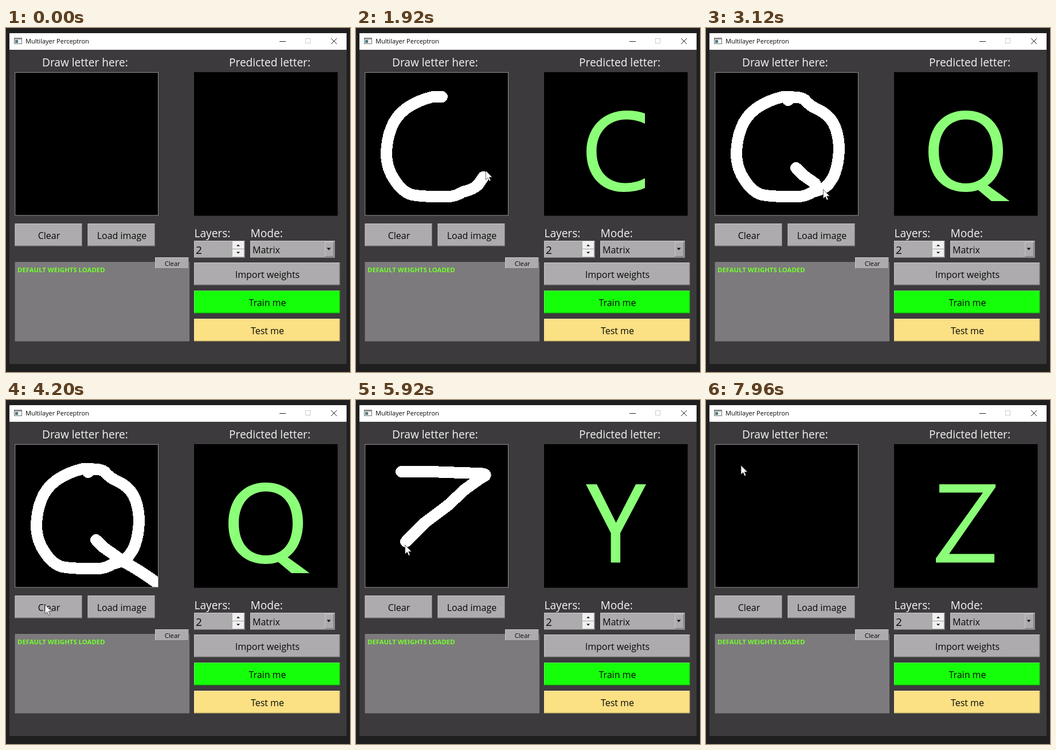
These frames come from a looping animation (600x600 px, 8 s). An HTML page:

```html
<!DOCTYPE html>
<html lang="en">
<head>
<meta charset="utf-8">
<title>Letter recogniser</title>
<style>
  html, body { margin: 0; width: 100%; height: 100%; overflow: hidden; background: #201f20; }
  svg { display: block; width: 100vw; height: 100vh; }
  text { font: 16px "Open Sans", "Noto Sans", sans-serif; fill: #080808; }
  .heading { font-size: 19.1px; fill: #f4f4f4; }
  .middle { text-anchor: middle; }
  .ink { fill: none; stroke: #fff; stroke-width: 20; stroke-linecap: round; stroke-linejoin: round; }
</style>
</head>
<body>
<svg id="stage" viewBox="0 0 600 600">
  <defs><clipPath id="board"><rect x="16" y="78" width="249" height="248"/></clipPath></defs>
  <rect width="600" height="600" fill="#201f20"/>
  <rect x="6" y="9" width="588" height="577" fill="#3c3a3c"/>

  <rect x="6" y="9" width="588" height="29" fill="#fff"/>
  <rect x="14.5" y="17.5" width="13" height="10" fill="#f4f4f4" stroke="#777"/>
  <path d="M15 18h12v2h-12z" fill="#999"/>
  <path d="M16 21h5v5h-5z" fill="#4d7d82"/>
  <text x="34" y="27" style="font-size:11px">Multilayer Perceptron</text>
  <g fill="none" stroke="#222">
    <path d="M477 23.5h11M567 18l10 10M577 18l-10 10"/>
    <rect x="522.5" y="18.5" width="8" height="8" stroke="#ccc"/>
  </g>

  <text class="heading" x="63" y="67">Draw letter here:</text>
  <text class="heading" x="389" y="67">Predicted letter:</text>
  <rect x="15.8" y="77.5" width="249.7" height="249.3" stroke="#929092"/>
  <rect x="328" y="77" width="250.5" height="250.5"/>
  <rect x="15.5" y="408" width="304.5" height="138.5" fill="#7d7a7d"/>
  <text x="20" y="426" style="font-size:11.35px;font-weight:700;fill:#73ff2e">DEFAULT WEIGHTS LOADED</text>
  <text class="heading" x="328.5" y="365">Layers:</text>
  <text class="heading" x="426.5" y="365">Mode:</text>
  <g id="controls"></g>
  <text x="331" y="394" style="font-size:19px">2</text>
  <text x="430" y="392.5">Matrix</text>
  <path d="M402 380.5h6l-3-3zM402 390.5h6l-3 3zM559.5 383.5h7l-3.5 4z" fill="#111"/>

  <path id="prediction" fill="#8cff78"/>
  <g id="drawing" clip-path="url(#board)" shape-rendering="crispEdges"></g>
  <path id="cursor" d="M0 0V16L3.7 12.5 6.3 18.5 8.7 17.4 6.2 11.6H11.3Z" fill="#fff" stroke="#222" stroke-width=".7"/>
</svg>
<script>
const LOOP = 8000, STEP = 40, INK_LAG = 40;
const $ = id => document.getElementById(id);

function add(parent, tag, attributes, text = "") {
  const node = document.createElementNS("http://www.w3.org/2000/svg", tag);
  for (const key in attributes) node.setAttribute(key, attributes[key]);
  node.textContent = text;
  parent.append(node);
  return node;
}

function button(x, y, w, h, fill, label = "", size = 16) {
  const box = $("controls");
  add(box, "rect", { x, y, width: w, height: h, fill });
  add(box, "path", { d: `M${x + .5} ${y + h}V${y + .5}H${x + w}`, fill: "none", stroke: "#fff", "stroke-opacity": .35 });
  add(box, "path", { d: `M${x} ${y + h - .5}H${x + w - .5}V${y}`, fill: "none", stroke: "#000", "stroke-opacity": .35 });
  add(box, "text", { class: "middle", x: x + w / 2 + .7, y: y + h / 2 + size * .46, style: `font-size:${size}px` }, label);
}

const GREY = "#adabad";
button(15.5, 341, 117.5, 39.5, GREY, "Clear");
button(142.5, 341, 117.5, 39.5, GREY, "Load image");
button(260, 400, 59, 20, GREY, "Clear", 11.2);
button(328, 409, 254.5, 39.5, GREY, "Import weights");
button(328, 458, 254.5, 39.5, "#15ff0a", "Train me");
button(328, 507, 254.5, 39.5, "#fbe084", "Test me");
button(328, 371, 89, 30, GREY);
button(395, 372, 21, 14, "#f0f0f0");
button(395, 386, 21, 14, "#f0f0f0");
button(426, 371, 148, 30, GREY);
button(556, 373, 16, 26, GREY);

const ring = "M453 144C494 144 518 172 518 214C518 257 493 286 453 286C413 286 388 258 388 216C388 173 413 144 453 144Z" +
  "M453 159.5C425 159.5 406 181 406 215C406 249 424 271 453 271C482 271 500 250 500 215C500 180 482 159.5 453 159.5Z";
const LETTERS = {
  C: "M504 149Q490 144 473 144C430 144 402 174 402 216C402 258 428 286 467 286Q489 286 504 279V262Q489 270.5 470 270.5C438 270.5 419.5 248 419.5 215C419.5 182 440 159.5 472 159.5Q489 159.5 504 167Z",
  O: ring,
  Q: ring + "M474 282L491 274 529.5 302H498Z",
  Y: "M401 147H420L453.5 214 488 147H506L461 232V283.5H444.5V232Z",
  Z: "M407 147H505V152L424 268.5H503V283.5H401V276L483 161.5H407Z"
};
const PREDICTIONS = [[0, ""], [1400, "C"], [2240, "O"], [3000, "Q"], [5520, "Y"], [6280, "Z"]];

const linear = p => p;
const smooth = p => p * p * (3 - 2 * p);

// Pointer gestures: start, end, path; those with a clear time leave ink.
const gestures = [
  [600, 880, "M606 500Q560 490 499 466"],
  [880, 1060, "M499 466L145 120"],
  [1160, 1880, "M150 120H134Q108 126 88 140Q70 153 62 173Q53 195 53 222Q54 245 66 263Q80 286 98 291Q115 294 140 294H163Q175 293 186 286Q207 281 214 272L222 260", 4400],
  [1880, 2520, "M222 260Q231 240 232 213Q232 185 222 166Q213 150 195 142Q181 136 172 125Q163 119 148 122L143 126", 4400],
  [2580, 2900, "M143 126Q108 180 157 244"],
  [2980, 3300, "M157 244L170 257 190 271 205 282Q235 298 270 324", 4400],
  [3360, 4000, "M270 324C270 470 110 480 68 357"],
  [5080, 5240, "M68 357L79 125"],
  [5280, 5880, "M79 125H130L212 128Q228 128 225 132L215 138 190 156 160 184 120 214 87 247", 7100],
  [5880, 6520, "M87 247L83 253Q130 250 170 251L232 254", 7100],
  [6560, 6880, "M232 254Q170 340 70 357"],
  [7400, 7760, "M70 357L61 114"]
].map(([start, end, d, clear]) => {
  const path = add($("drawing"), "path", { d, class: "ink" });
  const length = path.getTotalLength();
  const ease = clear ? linear : smooth;
  const progress = t => ease(Math.min(1, Math.max(0, (t - start) / (end - start))));
  return { start, clear, path, length, progress };
});

function render(t) {
  for (const { start, clear, path, length, progress } of gestures) {
    const inked = clear && t - INK_LAG >= start && t < clear;
    path.style.display = inked ? "" : "none";
    path.style.strokeDasharray = `${progress(t - INK_LAG) * length + .01} ${length * 2}`;
  }

  const current = gestures.findLast(g => g.start <= t);
  $("cursor").style.display = current ? "" : "none";
  if (current) {
    const { x, y } = current.path.getPointAtLength(current.progress(t) * current.length);
    $("cursor").setAttribute("transform", `translate(${x} ${y})`);
  }

  const letter = PREDICTIONS.findLast(([from]) => from <= t)[1];
  $("prediction").setAttribute("d", LETTERS[letter] || "");
}

const origin = performance.now();
function frame() {
  const t = (performance.now() - origin) % LOOP;
  render(Math.floor(t / STEP) * STEP);
  requestAnimationFrame(frame);
}
frame();
</script>
</body>
</html>
```
